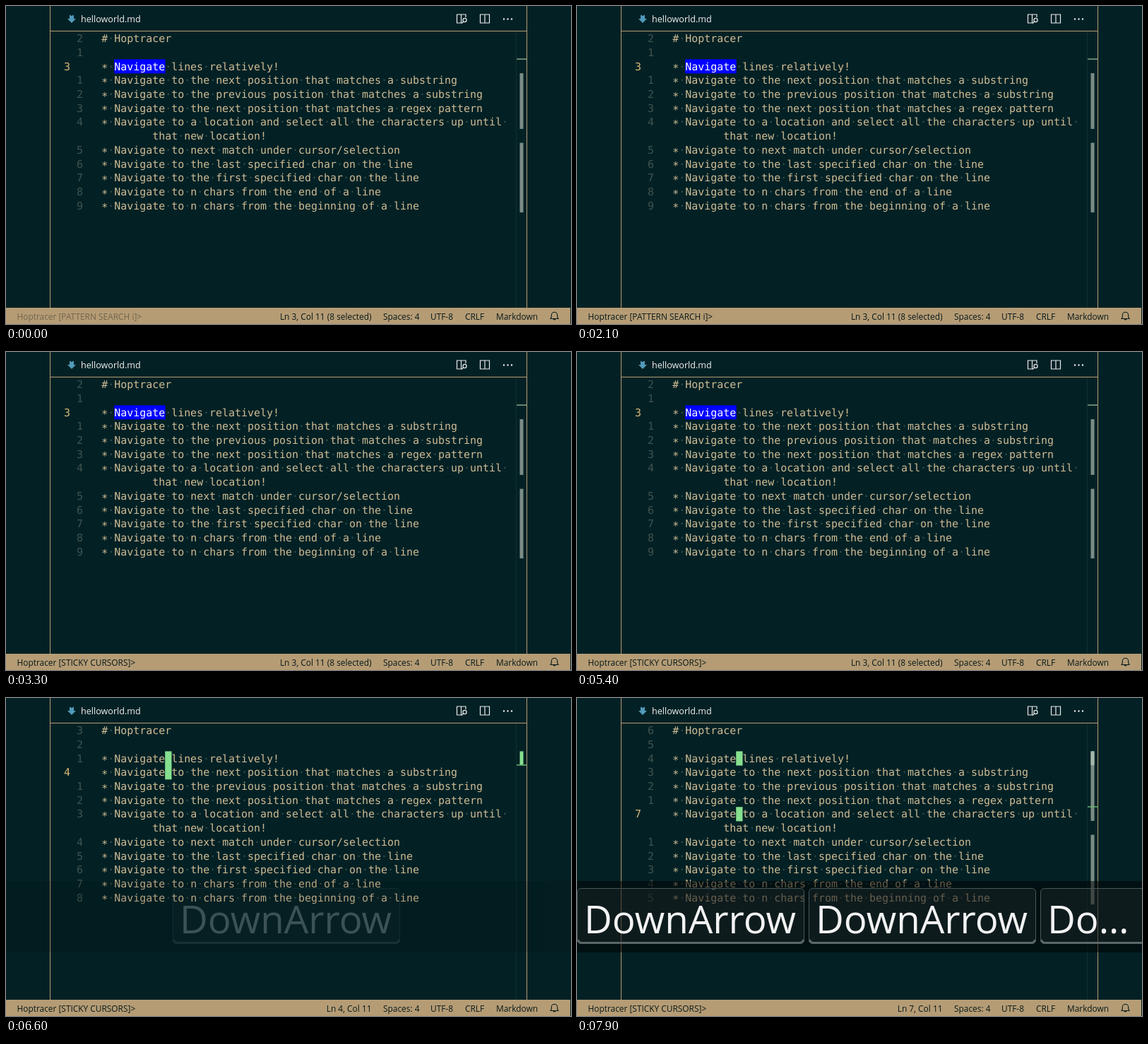
These frames come from a looping animation (800 by 450 pixels, 8 s). An HTML page:

```html
<!DOCTYPE html>
<html lang="en">
<head>
<meta charset="utf-8">
<title>Editor with sticky cursors</title>
<style>
  html, body { margin: 0; width: 100%; height: 100%; overflow: hidden; background: #032125; }
  svg { display: block; width: 800px; height: 450px; }
  text { font-family: "Open Sans", "Noto Sans", sans-serif; white-space: pre; }
  .code { font: 14.95px "DejaVu Sans Mono", monospace; fill: #cfbc95; text-rendering: geometricPrecision; }
  .dot { fill: #3c5450; }
  .number { fill: #40534f; text-anchor: end; }
  .status { font-size: 11.9px; fill: #08191a; }
  .icon { fill: none; stroke: #ececec; stroke-width: 1.2; }
</style>
</head>
<body>
<svg viewBox="0 0 800 450">
  <path d="M62.5 0V427M737.5 0V427M62 35.5H738" fill="none" stroke="#b59c75"/>
  <path d="M722.5 36V427" stroke="#10302f"/>
  <path d="M90 12.5l3 1.5 3-1.5v5.5h3l-6 6-6-6h3z" fill="#519aba"/>
  <text x="106" y="23" font-size="12.6" fill="#f0f0f0">helloworld.md</text>
  <g class="icon">
    <path d="M645 24H638.500V12H651V16M644.500 12V24M647.600 22l-2.400 2.700"/>
    <circle cx="649.500" cy="20" r="2.600"/>
    <path d="M671.500 12H684.500V24H671.500ZM678 12V24"/>
  </g>
  <path d="M705 18.500h.01M710.500 18.500h.01M716 18.500h.01" stroke="#ececec" stroke-width="2.400" stroke-linecap="round"/>
  <rect y="427" width="799" height="23" fill="#b59c75"/>
  <g class="status">
    <text x="534" y="444">Spaces: 4</text>
    <text x="601" y="444">UTF-8</text>
    <text x="650" y="444">CRLF</text>
    <text x="694" y="444">Markdown</text>
  </g>
  <path d="M771 442.500l1.300-2.500v-2.500a4.200 4.200 0 0 1 8.400 0V440l1.300 2.500zM775 443a1.600 1.600 0 0 0 3 0" fill="none" stroke="#08191a" stroke-width="1.100"/>
  <g id="scene"></g>
</svg>
<script>
const PERIOD = 8000, LEFT = 135.2, ADVANCE = 9, TOP = 36, ROW = 19.7;
const GREEN = '#86e08e';
const LINES = [
  '# Hoptracer',
  '',
  '* Navigate lines relatively!',
  '* Navigate to the next position that matches a substring',
  '* Navigate to the previous position that matches a substring',
  '* Navigate to the next position that matches a regex pattern',
  '* Navigate to a location and select all the characters up until ',
  '* Navigate to next match under cursor/selection',
  '* Navigate to the last specified char on the line',
  '* Navigate to the first specified char on the line',
  '* Navigate to n chars from the end of a line',
  '* Navigate to n chars from the beginning of a line'
];
const DOWN_PRESSES = [6530, 7200, 7400, 7600];

// Key cap width and font size
const KEYS = { 'Ctrl+;': [161, 56.8], 'Ctrl+Shift': [264, 56.8], DownArrow: [322, 54.6] };
// Time shown, time cleared, keys with the time of each press
const OVERLAYS = [
  [1000, 1450, [['Ctrl+;', 1000]]],
  [2110, 2800, [['Ctrl+Shift', 2110]]],
  [6530, 7000, [['DownArrow', 6530]]],
  [7200, PERIOD, DOWN_PRESSES.slice(1).map(time => ['DownArrow', time])]
];

const clamp = v => Math.min(1, Math.max(0, v));
const column = n => LEFT + n * ADVANCE;
const rowTop = row => TOP + row * ROW;
const rowOf = line => line - 1 + (line > 7 ? 1 : 0); // line 7 wraps once
const rect = (x, y, w, h, fill) =>
  `<rect x="${x}" y="${y}" width="${w}" height="${h}" fill="${fill}"/>`;
const code = (x, row, content, attrs = 'class="code"') =>
  `<text x="${x}" y="${rowTop(row) + 15.2}" ${attrs}>${content}</text>`;

// Shows spaces as dots and lowers the bullet to the middle of its row
const decorate = s => s.split(' ').join('<tspan class="dot">·</tspan>')
  .replace(/^\*<tspan/, '<tspan dy="2.7">*</tspan><tspan dy="-2.7"');

const page = LINES.map((s, i) => code(LEFT, rowOf(i + 1), decorate(s))).join('') +
  code(column(8), 7, decorate('that new location!'));

function lineNumbers(current) {
  return LINES.map((_, i) => {
    const line = i + 1, row = rowOf(line);
    return line === current
      ? code(82, row, line, 'class="code" style="fill:#d6b878"')
      : code(109, row, Math.abs(line - current), 'class="code number"');
  }).join('');
}

function cursorOpacity(t, lastPress) {
  if (lastPress) return (t - lastPress) % 1000 < 500 ? 1 : 0;
  const phase = (t + 550) % 1000; // off for the first half second
  return t < 450 ? 0 : phase < 500 ? clamp(phase / 130) : 1 - clamp((phase - 500) / 130);
}

function ruler(t, row, moved, lastPress) {
  const settled = !moved || t - lastPress > 250;
  const first = moved ? 2 : 3;
  let out = '';
  if (settled) {
    out += rect(727.5, rowTop(first), 5, (7 - first) * ROW, '#7c8c86') +
      rect(727.5, rowTop(8), 5, 5 * ROW, '#7c8c86');
  }
  if (moved) out += rect(727.5, rowTop(2), 5, ROW, settled ? '#a4b9ab' : GREEN);
  return out + rect(723, rowTop(row) - 1, 14.5, 1.5, moved ? '#66b673' : '#84a489');
}

function keyCap(x, key, label = key) {
  const [width, size] = KEYS[key];
  const text = label === key
    ? `x="${x + width / 2 - 1}" text-anchor="middle"`
    : `x="${x + 10}"`;
  return `<rect x="${x + .5}" y="269.500" width="${width - 1}" height="78" rx="5"
      fill="#808080" fill-opacity=".1" stroke="#46575a"/>
    <path d="M${x + 1.5} 342a5 5 0 0 0 5 4.500H${x + width - 6.5}a5 5 0 0 0 5 -4.500"
      fill="none" stroke="#5b686a" stroke-width="3"/>
    <text ${text} y="332.500" font-size="${size}" fill="#f2f2f2">${label}</text>`;
}

function keyboard(t) {
  return OVERLAYS.map(([start, end, presses]) => {
    const opacity = clamp((t - start) / 300) * (1 - clamp((t - end) / 250));
    if (!opacity) return '';
    const keys = t < end ? presses.filter(p => t >= p[1]).map(p => p[0]) : [];
    const total = keys.reduce((sum, key) => sum + KEYS[key][0] + 6, 0);
    let x = Math.max(0, (800 - total) / 2);
    const caps = keys.map(key => {
      const left = x;
      x += KEYS[key][0] + 6;
      return keyCap(left, key, x > 806 ? key.slice(0, 2) + '…' : key);
    }).join('');
    return `<g opacity="${opacity}">${rect(0, 259, 800, 101, 'rgba(0,0,0,.52)')}${caps}</g>`;
  }).join('');
}

function status(t, line, moved) {
  const mode = t < 2600 ? 'PATTERN SEARCH i' : 'STICKY CURSORS';
  const fill = t < 1400 ? '#71654c' : '#08191a';
  return `<text class="status" x="15.500" y="444" style="fill:${fill}">Hoptracer [${mode}]&gt;</text>
    <text class="status" x="517.500" y="444" text-anchor="end">Ln ${line}, Col 11${moved ? '' : ' (8 selected)'}</text>`;
}

function draw(t) {
  const done = DOWN_PRESSES.filter(time => t >= time);
  const moved = done.length > 0, lastPress = done.at(-1);
  const line = 3 + done.length, row = rowOf(line);
  const cursor = r => rect(column(10), rowTop(r), 9.3, ROW + .5, GREEN);
  const selection = moved ? '' :
    rect(column(2), rowTop(2), 8 * ADVANCE + .5, ROW + .3, '#0000ff') +
    code(column(2), 2, 'Navigate', 'class="code" style="fill:#fff"');
  return lineNumbers(line) + page + selection +
    `<g opacity="${cursorOpacity(t, lastPress)}">${cursor(2)}${moved ? cursor(row) : ''}</g>` +
    ruler(t, row, moved, lastPress) + status(t, line, moved) + keyboard(t);
}

const scene = document.getElementById('scene');
function tick() {
  scene.innerHTML = draw(performance.now() % PERIOD);
  requestAnimationFrame(tick);
}
tick();
</script>
</body>
</html>
```
